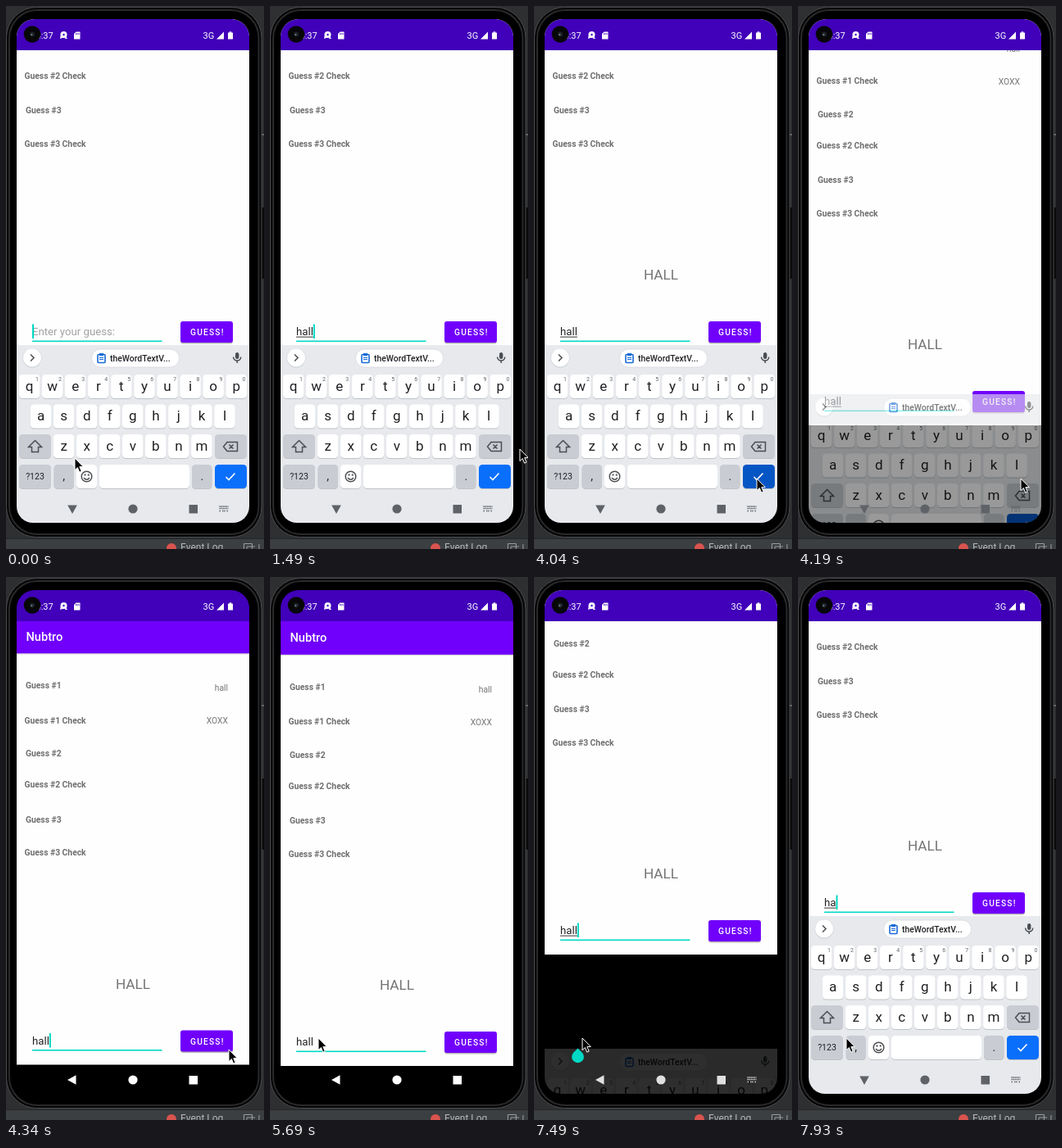
Animation of 315 by 663 pixels, one loop 8000 ms. Source, as an HTML page:

```html
<!DOCTYPE html>
<html lang="en">
<head>
<meta charset="utf-8">
<title>Word guess app</title>
<style>
html, body { margin: 0; width: 100%; height: 100%; overflow: hidden; background: #2d2f31; }
svg { display: block; width: 100vw; height: 100vh; font-family: Roboto, Arial, sans-serif; }
.label { font-weight: 700; font-size: 10.3px; fill: #6f6f6f; }
.value { font-size: 10.3px; fill: #757575; text-anchor: end; }
.mid { text-anchor: middle; }
.line { fill: none; stroke: #4a4d51; stroke-width: 1.5; }
</style>
</head>
<body>
<svg viewBox="0 0 315 663" xmlns="http://www.w3.org/2000/svg">
  <defs>
    <clipPath id="screen"><path d="M13 38a22 22 0 0 1 22-22H275a22 22 0 0 1 22 22V611a20 20 0 0 1-20 20H33a20 20 0 0 1-20-20Z"/></clipPath>
    <clipPath id="buttonClip"><rect x="213" y="555" width="64" height="26" rx="3"/></clipPath>
  </defs>
  <rect width="315" height="663" fill="#2d2f31"/>
  <rect y="651" width="315" height="12" fill="#3c3f41"/>
  <path d="M0 650.5H315" stroke="#242628"/>
  <circle cx="202" cy="662" r="6" fill="#d9534f"/>
  <text x="213" y="665" font-size="12" fill="#b4b6b8">Event Log</text>
  <path d="M290.5 664V656.500H300.500V664M294 664V660H304M309 657V664" fill="none" stroke="#9a9da0"/>
  <path d="M312 157H315" stroke="#a0a0a0"/>
  <rect x="311" y="246" width="4" height="87" fill="#0b0b0b"/>
  <rect x=".5" y="1.500" width="311.500" height="647" rx="37" fill="#050505" stroke="#4b4c4e"/>
  <rect x="4" y="5" width="304.500" height="640" rx="34" fill="#000" stroke="#29292b" stroke-width="2"/>

  <g clip-path="url(#screen)">
    <rect x="13" y="16" width="284" height="615"/>
    <g id="page">
      <rect x="13" y="54" width="284" height="543" fill="#fefefe"/>
      <rect x="13" y="94" width="284" height="2" fill="#ddd"/>
      <rect x="13" y="54" width="284" height="40.800" fill="#7000fb"/>
      <text x="24.500" y="79.300" font-size="14.600" font-weight="500" fill="#fff">Nubtro</text>
      <g id="labels"></g>
      <text class="value" x="271" y="140.500" id="guess">hall</text>
      <text class="value" x="271" y="180.700" id="check">XOXX</text>
      <text class="mid" id="word" x="155" y="504" font-size="17.200" fill="#757575">HALL</text>
      <text id="hint" x="32" y="572.300" font-size="13.200" fill="#a2a2a2">Enter your guess:</text>
      <text id="entry" x="32" y="572.300" font-size="13.200" fill="#222"></text>
      <rect id="compose" x="32" y="573.600" height="1" fill="#333"/>
      <rect id="caret" y="558.500" width="2" height="17.500" fill="#00d9c5"/>
      <rect x="32" y="578.500" width="158.500" height="1.600" fill="#00d9c5"/>
      <rect id="shadow" x="213" y="556" width="64" height="26.500" rx="3" fill="#000" opacity=".28"/>
      <rect x="213" y="555" width="64" height="26" rx="3" fill="#7000fb"/>
      <circle id="ripple" cx="262" cy="573" fill="#fff" opacity=".24" clip-path="url(#buttonClip)"/>
      <text x="225" y="572" font-size="10.200" font-weight="500" letter-spacing="1.200" fill="#fff">GUESS!</text>
    </g>

    <rect x="13" y="16" width="284" height="38" fill="#4100b9"/>
    <g fill="#fff" font-size="11">
      <text x="36.500" y="40">4:37</text>
      <circle cx="70.500" cy="35" r="4"/><path d="M66 40l1-5 4 3ZM73 37l2 3h-3Z"/>
      <circle cx="70.500" cy="35" r="1.200" fill="#4100b9"/>
      <path d="M85.500 31.500H90.500V40.500H83V34Z"/>
      <path d="M85.500 33v2M87.200 33v2M89 33v2" stroke="#4100b9" stroke-width=".8"/>
      <text x="240.500" y="40">3G</text>
      <path d="M266 31.500V40.500H257ZM271 32.500h1.800v-1.200h2.400v1.200H277V40.500H271Z"/>
    </g>

    <g id="keyboard">
      <rect x="13" y="414" width="284" height="330" fill="#e7e9ed"/>
      <circle cx="32" cy="430" r="11.500" fill="#ccd0d5"/><circle cx="32" cy="429.500" r="11" fill="#fff"/>
      <path class="line" d="M30 425.500l4 4-4 4"/>
      <rect x="104.500" y="419" width="107" height="22" rx="11" fill="#fff" stroke="#d5d8dc" stroke-width=".8"/>
      <rect x="112" y="425.500" width="9" height="10" rx="1" fill="none" stroke="#1769d8" stroke-width="1.600"/>
      <path d="M114 424h5v3h-5ZM114 429h5v1h-5ZM114 431h5v1h-5Z" fill="#1769d8"/>
      <text x="127" y="434" font-size="10.400" font-weight="500" fill="#202124">theWordTextV...</text>
      <rect x="280" y="423" width="4.400" height="8" rx="2.200" fill="#4a4d51"/>
      <path class="line" d="M277.700 428.500a4.500 4.500 0 0 0 9 0M282.200 433v3"/>
      <g id="keys"></g>
      <path class="line" d="M35.500 530.500l8 8h-4v6h-8v-6h-4Z"/>
      <path class="line" d="M270 532.500h12.500v11H270l-4.500-5.500ZM272.500 535.500l5 5m0-5l-5 5"/>
      <circle class="line" cx="98.500" cy="574.500" r="6.300"/>
      <path class="line" d="M95 576q3.500 4.500 7 0"/>
      <path d="M95.500 571.500h2v2h-2ZM99.700 571.500h2v2h-2Z" fill="#4a4d51"/>
      <path d="M268.500 575l3.500 3.500 7.500-8" fill="none" stroke="#fff" stroke-width="1.600"/>
    </g>

    <g id="nav">
      <path id="back" d="M75 614L85.500 608.200V619.800Z"/>
      <circle cx="155" cy="614" r="5.600"/>
      <rect x="223.500" y="609" width="10.500" height="10.500"/>
      <path id="switcher" d="M260.500 611h11M260.500 613.500h11M260.500 616.500h2m1.500 0h4m1.500 0h2" fill="none" stroke-width="1.600" stroke-dasharray="1.500 .6"/>
    </g>
    <path id="handle" d="M53.500 575.500l5.300 5.200a7.400 7.400 0 1 1-10.600 0Z" fill="#00d9c5"/>
  </g>

  <circle cx="32" cy="34.500" r="10.300" fill="#070707"/>
  <circle cx="32" cy="34.500" r="3" fill="#1d2328"/>
  <circle cx="31.300" cy="35" r="1" fill="#7c8790"/>
  <path id="mouse" d="M0 0V14.600L3.400 11.500 5.700 17.200 8.200 16.100 5.800 10.600H10.300Z" fill="#000" stroke="#fff" stroke-width="1"/>
</svg>
<script>
const $ = id => document.getElementById(id);
const LOOP = 8000, STEP = 150;

$("labels").innerHTML = [134, 176.3, 217, 255, 297.5, 338].map((y, i) =>
  `<text class="label" x="${i % 2 ? 22.5 : 24}" y="${y + 3.7}">Guess #${(i >> 1) + 1}${i % 2 ? " Check" : ""}</text>`).join("");

function key(x, y, w, fill, label = "", size = 17, id = "") {
  return `<rect x="${x}" y="${y + 1}" width="${w}" height="29" rx="4.500" fill="#bfc3c8"/>
    <rect id="${id}" x="${x}" y="${y}" width="${w}" height="29" rx="4.500" fill="${fill}"/>
    <text class="mid" x="${x + w / 2}" y="${y + 14.5 + size * .31}" font-size="${size}" fill="#202124">${label}</text>`;
}
const row = (letters, cx, y) => [...letters].map((c, i) => key(cx + i * 28.05 - 12.8, y, 25.6, "#fff", c)).join("");
const GREY = "#c9cdd3";
$("keys").innerHTML = row("qwertyuiop", 28.7, 450) + row("asdfghjkl", 42.6, 486.5) + row("zxcvbnm", 70.6, 523) +
  [..."1234567890"].map((d, i) => `<text class="mid" x="${38 + i * 28.05}" y="458" font-size="7" fill="#5f6368">${d}</text>`).join("") +
  key(16, 523, 39, GREY) + key(255, 523, 39, GREY) +
  key(16, 560, 39, GREY, "?123", 10.5) + key(58.5, 560, 24.5, GREY, ",", 14) + key(86, 560, 25, "#fff") +
  key(114, 560, 110, "#fff") + key(227, 560, 24.5, GREY, ".", 14) + key(255, 560, 39, "#0a6ffb", "", 17, "enter");

// Tracks: [tick, value...] with linear motion between the points
const MOUSE = [[8, 84, 552], [10, 305, 541], [11, 264, 411], [13, 262, 411], [17, 264, 398], [18, 264, 398],
  [20, 158, 397], [22, 156, 396], [23, 158, 397], [24, 158, 397], [26, 270, 570], [27, 272, 577], [29, 272, 577],
  [31, 205, 520], [32, 170, 508], [33, 110, 520], [35, 37, 576], [38, 59, 563]];
const PAN = [[27, 170], [28, 85], [29, 1.5], [30, 0], [47, 0], [48, 12], [49, 70], [50, 136], [51, 165], [52, 170]];
// keyboard drop and opacity
const KEYS = [[27, 0, 1], [28, 60, .6], [29, 217, 0], [49, 217, 0], [50, 162, .18], [51, 55, .8], [52, 0, 1]];
const TYPED = [[0, ""], [5, "h"], [7, "ha"], [8, "hal"], [9, "hall"], [52, "hal"], [53, "ha"]];
const CARET_OFF = [[14, 16], [20, 22], [26, 28], [32, 34], [38, 43]];

function along(track, n) {
  const i = track.findIndex(p => p[0] >= n);
  if (i < 0) return track.at(-1).slice(1);
  if (i === 0) return track[0].slice(1);
  const a = track[i - 1], b = track[i], k = (n - a[0]) / (b[0] - a[0]);
  return a.slice(1).map((v, j) => v + (b[j + 1] - v) * k);
}
const within = (n, a, b) => n >= a && n <= b;
const show = (id, on) => $(id).setAttribute("visibility", on ? "visible" : "hidden");
const set = (id, attrs) => { for (const k in attrs) $(id).setAttribute(k, attrs[k]); };

function draw(time) {
  const n = Math.floor((time % LOOP + 20) / STEP);
  const [drop, alpha] = along(KEYS, n);
  const text = TYPED.filter(p => p[0] <= n).at(-1)[1];
  const light = alpha < .5, ime = n < 29 || n >= 49;

  set("page", { transform: `translate(0 ${-along(PAN, n)[0]})` });
  set("keyboard", { transform: `translate(0 ${drop})`, opacity: alpha });
  set("mouse", { transform: `translate(${along(MOUSE, n).join(" ")})` });
  set("enter", { fill: within(n, 27, 28) ? "#0556c4" : "#0a6ffb" });

  $("entry").textContent = text;
  const width = text ? $("entry").getComputedTextLength() : 0;
  set("caret", { x: 32 + width });
  set("compose", { width });
  show("compose", ime);
  show("hint", !text);
  show("caret", !CARET_OFF.some(([a, b]) => within(n, a, b)));

  show("word", n >= 14);
  show("guess", n >= 14);
  show("check", n >= 14);
  set("ripple", { r: within(n, 13, 16) ? (n - 12) * 17 : 0, opacity: .3 - Math.max(0, n - 13) * .08 });
  set("shadow", { height: within(n, 13, 16) ? 29 : 26.5 });

  set("nav", { fill: !light ? "#5f6368" : n >= 49 ? "#e0e0e0" : "#fff" });
  set("back", { transform: light ? "" : "rotate(-90 81 614)" });
  set("switcher", { stroke: light ? "#d0d0d0" : "#5f6368" });
  show("switcher", ime);
  show("handle", within(n, 46, 50));
}

const start = performance.now();
function frame() {
  draw(performance.now() - start);
  requestAnimationFrame(frame);
}
frame();
</script>
</body>
</html>
```
